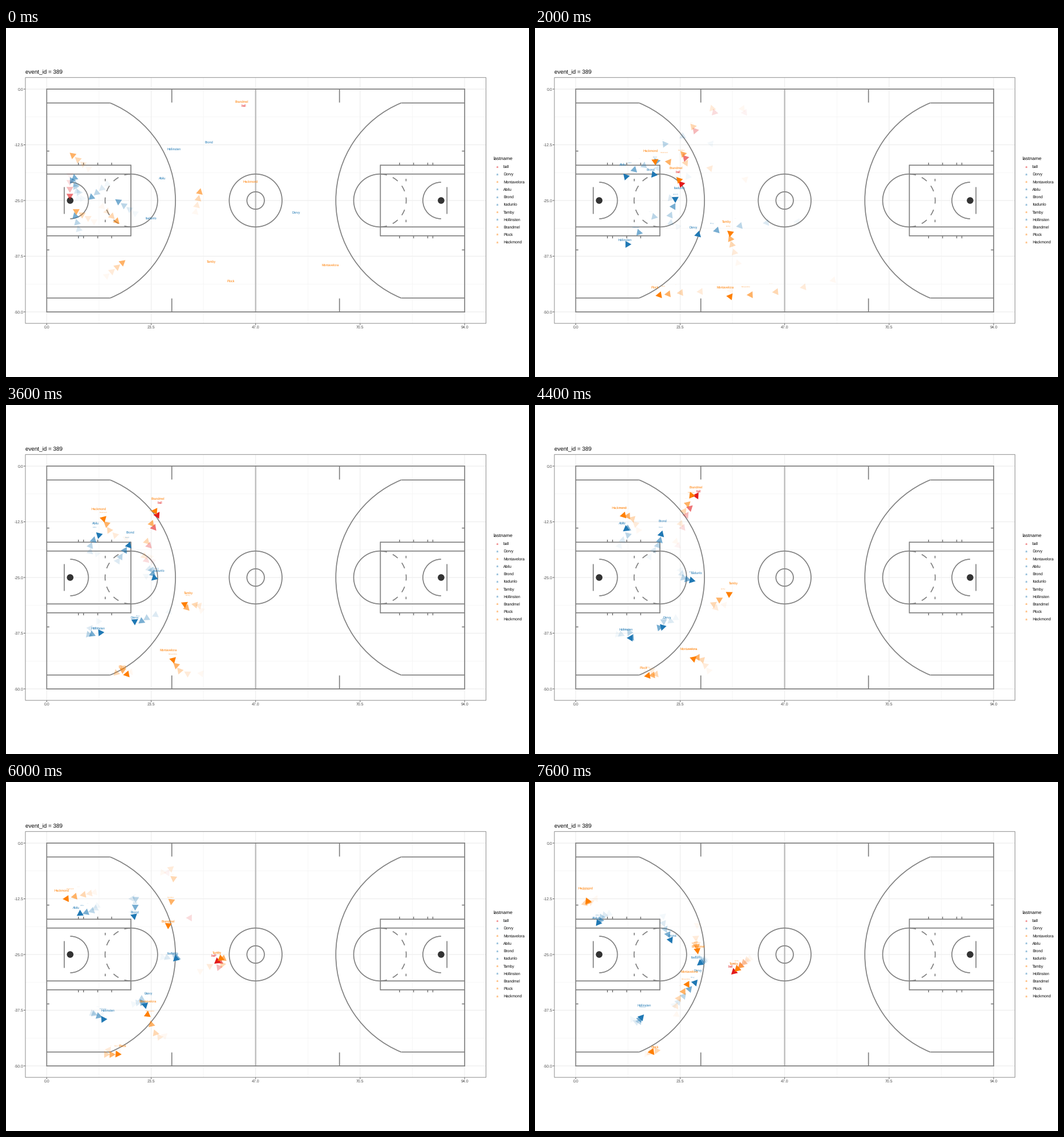
A matplotlib script that plays this animation: 917 px wide and 611 px high, repeating every 8000 ms.

```python
import numpy as np
import matplotlib.pyplot as plt
from matplotlib.animation import FuncAnimation
from matplotlib.patches import Arc, Circle, Polygon, Rectangle

W, H, DPI = 917, 611, 64
FRAMES, INTERVAL = 20, 400
RED, BLUE, ORANGE = "#e31a1c", "#1f78b4", "#ff7f00"
GREY = "#808080"
MID_X, MID_Y = 437.7, 302

plt.rcParams["font.family"] = "Liberation Sans"
plt.rcParams["text.hinting"] = "none"
plt.rcParams["path.snap"] = False


def px(size):
    return size * 72 / DPI


fig = plt.figure(figsize=(W / DPI, H / DPI), dpi=DPI, facecolor="white")
ax = fig.add_axes([0, 0, 1, 1])
ax.set_xlim(0, W)
ax.set_ylim(H, 0)
ax.axis("off")


def line(xs, ys, color=GREY, lw=1.7, z=2, **kw):
    ax.plot(xs, ys, color=color, lw=px(lw), zorder=z,
            solid_capstyle="butt", **kw)


def write(x, y, s, size, color="black", ha="left", **kw):
    return ax.text(x, y + 0.36 * size, s, fontsize=px(size), color=color,
                   ha=ha, va="baseline", zorder=6, **kw)


def arc(x, y, r, mid, spread):
    ax.add_patch(Arc((x, y), 2 * r, 2 * r, theta1=mid - spread,
                     theta2=mid + spread, color=GREY, lw=px(1.7), zorder=2))


def frame_box(x, y, w, h, color, lw):
    ax.add_patch(Rectangle((x, y), w, h, fill=False, ec=color, lw=px(lw),
                           zorder=3))


def draw_panel():
    for i in range(9):
        x, y = 71.4 + 91.58 * i, 107 + 48.75 * i
        major = i % 2 == 0
        color, lw = ("#ebebeb", 1) if major else ("#f1f1f1", 0.6)
        line([x, x], [87, 517], color, lw, 1)
        line([34, 841], [y, y], color, lw, 1)
        if major:
            line([x, x], [517, 520], "#333333", 0.8)
            line([31, 34], [y, y], "#333333", 0.8)
            write(x, 523.5, f"{11.75 * i:.1f}", 7, "#4d4d4d", "center")
            depth = f"-{6.25 * i:.1f}" if i else "0.0"
            write(30.5, y, depth, 7, "#4d4d4d", "right")
    frame_box(34, 86.7, 807.6, 430.4, "#8c8c8c", 1)
    write(34, 76.5, "event_id = 389", 9.9)


def draw_half(side):
    """Half of the court; side is 1 for the left and -1 for the right."""
    out = 0 if side == 1 else 180

    def fx(x):
        return MID_X + side * (x - MID_X)

    def seg(x0, y0, x1, y1):
        for sign in (1, -1):
            line([fx(x0), fx(x1)],
                 [MID_Y + sign * (y0 - MID_Y), MID_Y + sign * (y1 - MID_Y)])

    seg(71.4, 131.3, 182, 131.3)
    seg(71.4, 240.2, 219, 240.2)
    seg(71.4, 255.7, 219, 255.7)
    seg(219, 239.4, 219, MID_Y)
    seg(102.2, 278.5, 102.2, MID_Y)
    seg(290.7, 107, 290.7, 130.5)
    seg(71.4, 215.5, 76, 215.5)
    seg(174, 264, 174, 268.3)
    for x in (127, 136, 160.8, 185.3):
        seg(x, 235.8, x, 240)
    arc(fx(112.5), MID_Y, 184.6, out, 67.8)
    arc(fx(112.5), MID_Y, 32, out, 90)
    arc(fx(219.5), MID_Y, 46.3, out, 90)
    for dash in range(-3, 4):
        arc(fx(220), MID_Y, 46.3, out + 180 + 27 * dash, 6.7)
    ax.add_patch(Circle((fx(112.5), MID_Y), 5.8, fc="#333333", lw=0, zorder=3))


def draw_court():
    draw_half(1)
    draw_half(-1)
    frame_box(71.4, 106.9, 732.8, 390.2, GREY, 1.7)
    line([MID_X, MID_X], [107, 497], "#bebebe", 2.4)
    arc(MID_X, MID_Y, 46.3, 0, 180)
    arc(MID_X, MID_Y, 15.3, 0, 180)


KEYS = np.array([0, 2, 5, 9, 13, 15, 19])


def spline(*points):
    """Smooth path through one point for each frame in KEYS."""
    points = np.array(points, float)
    slopes = np.gradient(points, KEYS, axis=0)

    def path(n):
        i = min(np.searchsorted(KEYS, n, side="right") - 1, len(KEYS) - 2)
        span = KEYS[i + 1] - KEYS[i]
        u = (n - KEYS[i]) / span
        ease = u * u * (3 - 2 * u)
        return (points[i] + ease * (points[i + 1] - points[i])
                + span * u * (1 - u)
                * ((1 - u) * slopes[i] - u * slopes[i + 1]))

    return path


FADE = (1, 0.6, 0.3, 0.15, 0.05)
SHRINK = (1, 0.53, 0.22)
LABEL_SIZE, LABEL_RISE, SWING, STRIDE = 5.5, 15, 7, 12


class Mover:
    """Named triangle with a wake; `before` is its last x, y, heading earlier."""

    def __init__(self, name, color, before, path):
        self.name, self.color, self.path = name, color, path
        self.before = np.array(before[:2], float)
        a = np.radians(before[2])
        self.before_ahead = np.array([np.cos(a), -np.sin(a)])
        self.marks = [ax.add_patch(Polygon(np.zeros((3, 2)), fc=color, lw=0,
                                           alpha=f, zorder=5 - 0.1 * age))
                      for age, f in enumerate(FADE)]
        self.labels = [write(0, 0, name, LABEL_SIZE * s, color, "center",
                             alpha=f) for s, f in zip(SHRINK, FADE)]

    def triangle(self, n):
        """Corners at frame n, the tip towards the next step of the path."""
        if n < 0:
            ahead = self.before_ahead
            centre = self.before + STRIDE * (n + 1) * ahead
        else:
            start = min(n, FRAMES - 2)
            step = self.path(start + 1) - self.path(start)
            ahead = step / max(np.hypot(*step), 1e-6)
            centre = self.path(n) - SWING * ahead
        across = 6 * np.array([ahead[1], -ahead[0]])
        base = centre - 4.8 * ahead
        return [centre + 5.7 * ahead, base + across, base - across]

    def show(self, n):
        for age, mark in enumerate(self.marks):
            mark.set_visible(n != age)
            mark.set_xy(self.triangle(n - age))
        for age, label in enumerate(self.labels):
            label.set_visible(n >= age)
            x, y = self.path(max(n - age, 0))
            label.set_position((x, y - LABEL_RISE
                                + 0.36 * LABEL_SIZE * SHRINK[age]))


draw_panel()
draw_court()

dribbler = spline((413, 144), (305, 147), (247, 260), (266, 179), (293, 177),
                  (284, 259), (286, 303))
receiver = spline((360, 424), (347, 385), (336, 354), (320, 344), (374, 313),
                  (370, 314), (349, 333))


def ball_path(n):
    """Beside the dribbler, then passed between frames 11 and 13."""
    u = np.clip((n - 11) / 2, 0, 1)
    return (1 - u) * (dribbler(n) + (4, 7)) + u * (receiver(n) + (-6, 5))


movers = [
    Mover("ball", RED, (112, 295, 270), ball_path),
    Mover("Dorvy", BLUE, (120, 261, 100),
          spline((509, 338), (398, 342), (278, 364), (226, 387), (245, 384),
                 (250, 385), (286, 345))),
    Mover("Montavelora", ORANGE, (116, 222, 140),
          spline((569, 430), (463, 455), (334, 469), (285, 444), (259, 432),
                 (249, 399), (271, 347))),
    Mover("Abilu", BLUE, (115, 266, 120),
          spline((274, 278), (207, 245), (154, 254), (157, 222), (143, 228),
                 (123, 235), (106, 253))),
    Mover("Brond", BLUE, (149, 297, 220),
          spline((356, 215), (252, 194), (203, 263), (218, 238), (227, 213),
                 (226, 243), (241, 284))),
    Mover("Itadunlo", BLUE, (121, 328, 105),
          spline((254, 348), (239, 333), (253, 295), (268, 305), (294, 312),
                 (292, 315), (283, 322))),
    Mover("Tamby", ORANGE, (122, 320, 150), receiver),
    Mover("Hollinsten", BLUE, (196, 303, 145),
          spline((295, 227), (232, 304), (158, 386), (162, 406), (162, 409),
                 (179, 415), (192, 406))),
    Mover("Brandmel", ORANGE, (195, 339, 315), dribbler),
    Mover("Plock", ORANGE, (205, 410, 40),
          spline((394, 458), (282, 462), (210, 469), (204, 473), (184, 477),
                 (204, 477), (210, 479))),
    Mover("Hackmond", ORANGE, (340, 286, 78),
          spline((429, 284), (299, 244), (203, 230), (163, 197), (128, 199),
                 (98, 205), (89, 201))),
]

write(854, 227.5, "lastname", 8.4)
for row, mover in enumerate(movers):
    y = 243 + 13.15 * row
    write(861, y, "a", 5.5, mover.color, "center", alpha=0.7, weight="bold")
    write(872, y, mover.name, 6.7)


def update(n):
    for mover in movers:
        mover.show(n)
    return []


anim = FuncAnimation(fig, update, frames=FRAMES, interval=INTERVAL,
                     repeat=True, repeat_delay=0, blit=False)
plt.show()
```
